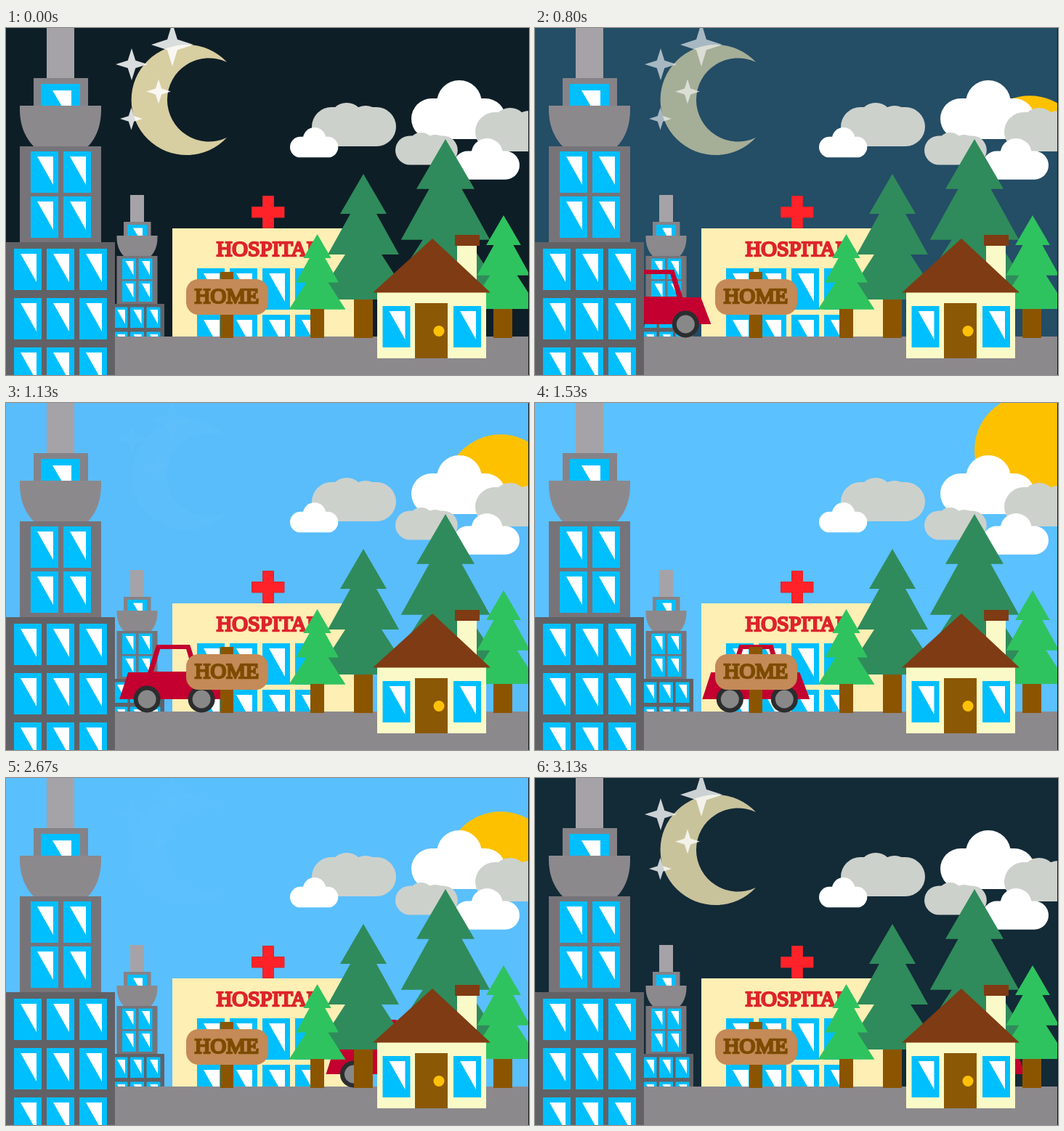
These frames come from a looping animation (720x478 px, 3190 ms). An HTML page:

```html
<!DOCTYPE html>
<html lang="en">
<head>
<meta charset="utf-8">
<title>Drive home</title>
<style>
  html, body { margin: 0; width: 100%; height: 100%; overflow: hidden; background: #000; }
  svg { display: block; width: 720px; height: 478px; }
  text { font: 30px "Liberation Serif", "Times New Roman", serif; text-anchor: middle; stroke-width: 2.5; }
</style>
</head>
<body>
<svg viewBox="0 0 720 478">
  <defs>
    <g id="pane">
      <path fill="#00bfff" d="M0 0H38V57H0Z"/>
      <path fill="#fff" d="M9 7H31V46Z"/>
    </g>
    <g id="tower">
      <path fill="#a5a3a8" d="M56-5H94V70H56Z"/>
      <path fill="#858388" d="M38 69H113V108H38Z"/>
      <path fill="#00bfff" d="M48 77H102V108H48Z"/>
      <path fill="#fff" d="M64 86H90V108H77Z"/>
      <path fill="#8c898d" d="M19 107H131V112C131 138 122 154 112 164H39C29 154 19 138 19 112Z"/>
      <path fill="#767479" d="M19 163H131V296H19Z"/>
      <path fill="#626165" d="M0 295H150V478H0Z"/>
      <g class="panes" data-x="34 79" data-y="170 232"></g>
      <g class="panes" data-x="11 56 101" data-y="304 372 440"></g>
    </g>
    <g id="puff">
      <rect y="25" width="130" height="56" rx="28"/>
      <circle cx="66" cy="31" r="31"/>
    </g>
    <g id="bank">
      <rect y="6" width="116" height="54" rx="27"/>
      <circle cx="48" cy="24" r="24"/>
      <circle cx="74" cy="27" r="23"/>
    </g>
    <path id="star" d="M0-1L.24-.24L1 0L.24.24L0 1L-.24.24L-1 0L-.24-.24Z"/>
    <g id="tree">
      <path fill="#8b5500" d="M-13 172H13V226H-13Z"/>
      <path d="M0 0L32 55H18L49 111H25L65 173H-65L-25 111H-49L-18 55H-32Z"/>
    </g>
    <clipPath id="horizon"><path d="M0 0H720V140H0Z"/></clipPath>
  </defs>

  <rect id="sky" width="720" height="478" fill="#5bc1ff"/>
  <g clip-path="url(#horizon)"><circle id="sun" cx="681" r="76" fill="#fdc100"/></g>

  <path class="night" fill="#fceeb8" d="M304 47A76 76 0 1 0 304 151A57.5 57.5 0 1 1 304 47Z"/>
  <g fill="#fff">
    <use class="night" href="#star" transform="translate(173 50) scale(22)"/>
    <use class="night" href="#star" transform="translate(229 23) scale(29 30)"/>
    <use class="night" href="#star" transform="translate(210 87.5) scale(17)"/>
    <use class="night" href="#star" transform="translate(172.5 125) scale(15.5)"/>
  </g>

  <g fill="#cdd1cc">
    <use href="#bank" transform="translate(421 103)"/>
    <use href="#puff" transform="translate(391 137) scale(.51)" fill="#fff"/>
    <use href="#puff" transform="translate(558 72)" fill="#fff"/>
    <use href="#bank" transform="translate(646 110)"/>
    <use href="#bank" transform="translate(536 144) scale(.74)"/>
    <use href="#puff" transform="translate(616 152) scale(.7)" fill="#fff"/>
  </g>

  <use href="#tower" transform="translate(143 232.5) scale(.5)"/>

  <path fill="#feefb4" d="M229 276H493V426H229Z"/>
  <g class="panes" data-x="263 308 353 398" data-y="331 395"></g>
  <path fill="#ff2229" stroke="#d8262c" d="M353.500 231.500H368.500V246.500H383V261H368.500V275.500H353.500V261H338.500V246.500H353.500Z"/>
  <text x="361" y="314" fill="#f8222a" stroke="#dc242b">HOSPITAL</text>

  <path fill="#8c898d" d="M0 425H720V478H0Z"/>

  <g id="car">
    <path fill="#c3002f" fill-rule="evenodd"
      d="M0 408L12 371H39L51 333H97L109 371H134L148 408ZM47 370H101L92 339H56Z"/>
    <g fill="#888" stroke="#2b2d2f" stroke-width="6">
      <circle cx="38" cy="408" r="15.500"/>
      <circle cx="113" cy="408" r="15.500"/>
    </g>
  </g>

  <use href="#tree" transform="translate(605 153) scale(1.25)" fill="#2f8b5b"/>
  <use href="#tree" transform="translate(492 201)" fill="#2f8b5b"/>

  <path fill="#8b5500" d="M295 336H313V427H295Z"/>
  <rect x="248" y="346" width="113" height="49" rx="17" fill="#c48a57"/>
  <text x="304" y="379" fill="#855000" stroke="#7c4b00">HOME</text>

  <g fill="#2fc35f">
    <use href="#tree" transform="translate(428.500 284) scale(.6)"/>
    <path fill="#8b5500" d="M419 387H438V427H419Z"/>
    <use href="#tree" transform="translate(685 258) scale(.746)"/>
    <path fill="#8b5500" d="M671 387H697V427H671Z"/>
  </g>

  <path fill="#fafac8" d="M511 362H661V455H511ZM621 298H648V350H621Z"/>
  <path fill="#7f3b13" d="M505 364.500L587 290L667 364.500ZM618 285H652V300H618Z"/>
  <path fill="#8b5806" d="M563 379H608V455H563Z"/>
  <circle cx="596" cy="417.500" r="7.500" fill="#ffc107"/>
  <g class="panes" data-x="518.500 616" data-y="383"></g>

  <use href="#tower"/>
  <path fill="#15181b" d="M719 0H720V478H719Z"/>
</svg>
<script>
  const LOOP = 3190, STEPS = 48;
  const $ = id => document.getElementById(id);

  for (const g of document.querySelectorAll('.panes')) {
    const xs = g.dataset.x.split(' '), ys = g.dataset.y.split(' ');
    g.innerHTML = ys.flatMap(y => xs.map(x => `<use href="#pane" x="${x}" y="${y}"/>`)).join('');
  }
  const night = document.querySelectorAll('.night');

  // cubic-bezier(.25, .1, .25, 1), solved by bisection
  function ease(x) {
    if (x <= 0) return 0;
    if (x >= 1) return 1;
    const bez = (a, b, s) => 3 * a * s * (1 - s) ** 2 + 3 * b * s * s * (1 - s) + s ** 3;
    let lo = 0, hi = 1;
    for (let i = 0; i < 20; i++) {
      const mid = (lo + hi) / 2;
      if (bez(.25, .25, mid) < x) lo = mid; else hi = mid;
    }
    return bez(.1, 1, lo);
  }

  // Dusk runs over the end of the loop, dawn begins after it.
  function daylight(t) {
    const dusk = 2640, dawn = 660;
    if (t < dawn) return 1 - ease((t + LOOP - dusk) / 1000);
    if (t < dusk) return ease((t - dawn) / 560);
    return 1 - ease((t - dusk) / 1000);
  }

  function draw(now) {
    const t = Math.floor(now % LOOP / LOOP * STEPS) / STEPS * LOOP;
    const day = daylight(t);
    $('sky').setAttribute('opacity', day);
    night.forEach(n => n.setAttribute('opacity', 1 - day));
    $('sun').setAttribute('cy', 126 - 80 * Math.cos(2 * Math.PI * (t - 1885) / LOOP));
    $('car').setAttribute('transform', `translate(${-54 + .186 * t} 0)`);
  }

  const start = performance.now();
  function tick() {
    draw(performance.now() - start);
    requestAnimationFrame(tick);
  }
  tick();
</script>
</body>
</html>
```
